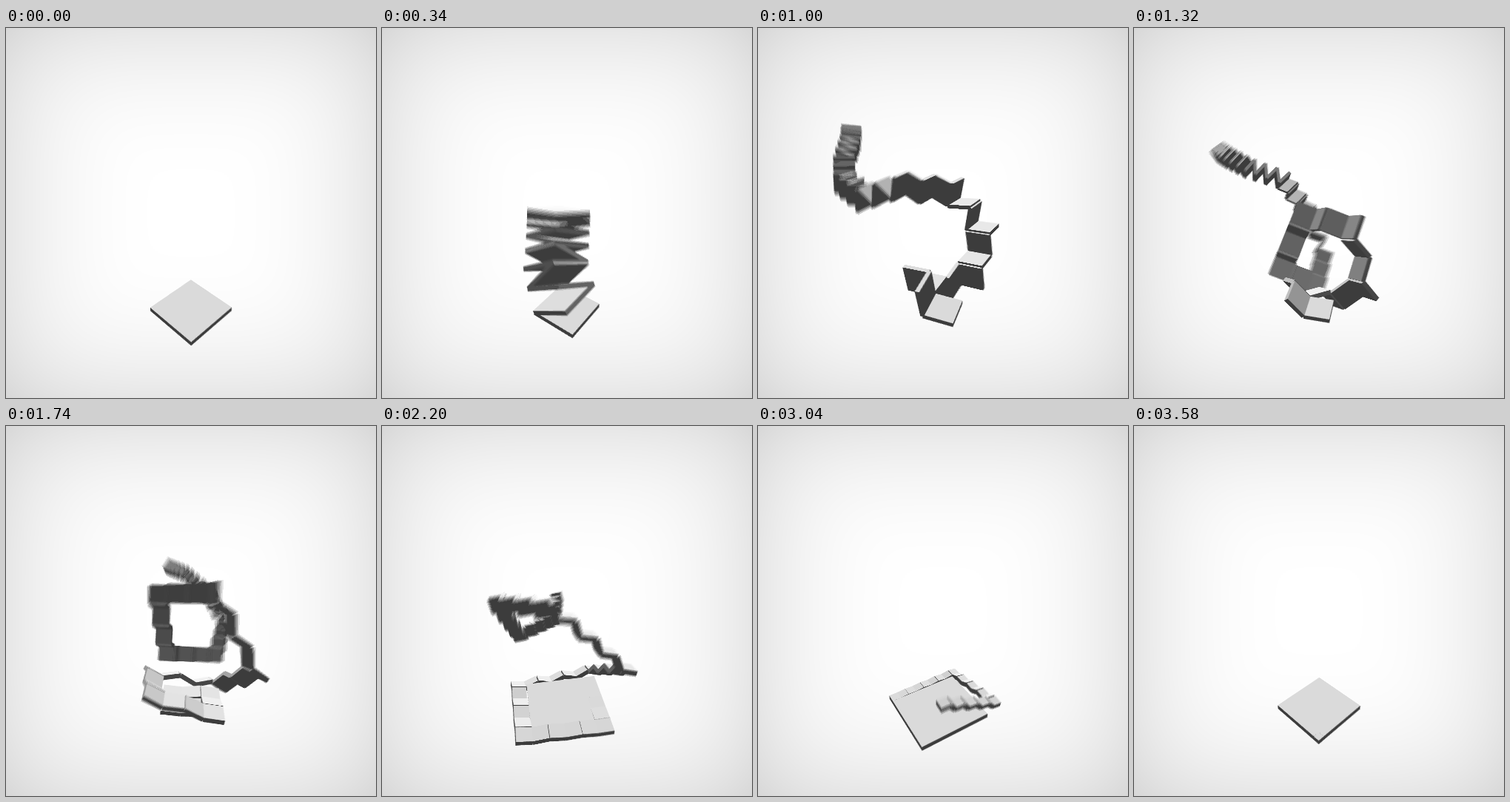
Write an HTML page with a canvas that moves like this. It is 500 px wide and 500 px high and loops after 3600 ms.

```html
<!DOCTYPE html>
<html lang="en">
<head>
<meta charset="utf-8">
<title>Unfolding tile</title>
<style>
  html, body { margin: 0; width: 100%; height: 100%; overflow: hidden; background: #fff; }
  canvas { display: block; }
</style>
</head>
<body>
<canvas id="stage" width="500" height="500"></canvas>
<script>
const SIZE = 500, MID = SIZE / 2;
const LOOP = 3600, FRAME = 20, SHUTTER = 16, SAMPLES = 8;
const EYE = 433, GROUND = 130, TILT = Math.PI / 6;
const SIDE = 78, THICK = 6.5, GRID = 9, HINGES = GRID * GRID - 1;

const ctx = document.getElementById('stage').getContext('2d');
const image = ctx.createImageData(SIZE, SIZE);
const pixels = new Uint32Array(image.data.buffer);
const depth = new Float32Array(SIZE * SIZE);
const shade = new Float32Array(SIZE * SIZE);
const total = new Float32Array(SIZE * SIZE);

// Soft vignette, white in the middle
const backdrop = Float32Array.from({ length: SIZE * SIZE }, (_, i) => {
  const x = (i % SIZE + 0.5 - MID) / MID;
  const y = (Math.floor(i / SIZE) + 0.5 - MID) / MID;
  return 255 - 25 * (x ** 4 + y ** 4) ** (2.7 / 4);
});

// Square spiral: left, back, right, front with legs of 1, 1, 2, 2, 3, 3, ...
const steps = [];
for (let leg = 0; steps.length < HINGES; leg++) {
  for (let j = 0; j <= leg >> 1 && steps.length < HINGES; j++) {
    steps.push({ axis: leg % 2 ? 2 : 0, sign: leg % 4 < 2 ? -1 : 1 });
  }
}

const dot = (a, b) => a[0] * b[0] + a[1] * b[1] + a[2] * b[2];
const mix = (a, k, b, m) => a.map((v, i) => v * k + b[i] * m);

function project([x, y, z]) {
  const f = EYE / (EYE - z);
  return [MID + x * f, MID + y * f];
}

// Fills a convex polygon, testing against the depth buffer
function fillFace(points, normal, centre, tone, jx, jy) {
  const scale = 1 / (dot(normal, centre) - EYE * normal[2]);
  const qx = normal[0] * scale, qy = normal[1] * scale, q0 = -EYE * normal[2] * scale;
  const ys = points.map(p => p[1]);
  const top = Math.max(0, Math.ceil(Math.min(...ys) - jy));
  const bottom = Math.min(SIZE, Math.ceil(Math.max(...ys) - jy));
  for (let row = top; row < bottom; row++) {
    const y = row + jy;
    let lo = Infinity, hi = -Infinity;
    for (let i = 0; i < 4; i++) {
      const a = points[i], b = points[(i + 1) % 4];
      if ((a[1] <= y) === (b[1] <= y)) continue;
      const x = a[0] + (b[0] - a[0]) * (y - a[1]) / (b[1] - a[1]);
      lo = Math.min(lo, x);
      hi = Math.max(hi, x);
    }
    const end = Math.min(SIZE, Math.ceil(hi - jx));
    for (let col = Math.max(0, Math.ceil(lo - jx)); col < end; col++) {
      const q = qx * (col + jx - MID) + qy * (y - MID) + q0;
      const i = row * SIZE + col;
      if (q > depth[i]) {
        depth[i] = q;
        shade[i] = tone;
      }
    }
  }
}

function drawTile(origin, axes, half, jx, jy) {
  for (let k = 0; k < 3; k++) {
    const u = (k + 1) % 3, v = (k + 2) % 3;
    for (const side of [-1, 1]) {
      const normal = axes[k].map(c => c * side);
      const centre = mix(origin, 1, normal, half[k]);
      if (dot(normal, [-centre[0], -centre[1], EYE - centre[2]]) <= 0) continue;
      const points = [[-1, -1], [1, -1], [1, 1], [-1, 1]].map(([a, b]) =>
        project(mix(mix(centre, 1, axes[u], a * half[u]), 1, axes[v], b * half[v])));
      const tone = 60 + 182 * Math.max(0, -normal[1]);
      fillFace(points, normal, centre, tone, jx, jy);
    }
  }
}

function drawChain(t, jx, jy) {
  const s = SIDE * GRID ** -t, half = [s / 2, THICK / 2, s / 2];
  const spin = Math.PI / 4 - t * Math.PI / 2;
  const c = Math.cos(spin), d = Math.sin(spin);
  const up = Math.sin(TILT), out = Math.cos(TILT);
  // Axes in view space: x right, y down, z towards the eye
  const axes = [[c, d * up, d * out], [0, -out, up], [-d, c * up, c * out]];
  let origin = [0, GROUND, 0];
  drawTile(origin, axes, half, jx, jy);

  for (let i = 0; i < HINGES; i++) {
    const open = Math.min(1, (t - 0.5 * (i + 1) / HINGES) / 0.5);
    if (open <= 0) break; // the rest lies folded in the same place
    const { axis, sign } = steps[i];
    const fold = (i % 2 ? -1 : 1) * Math.PI * (1 - open);
    const cos = Math.cos(fold), sin = Math.sin(fold);
    const along = axes[axis].map(v => v * sign), normal = axes[1];
    const turned = mix(along, cos, normal, sin);
    origin = mix(mix(origin, 1, along, s / 2), 1, turned, s / 2);
    axes[axis] = turned.map(v => v * sign);
    axes[1] = mix(normal, cos, along, -sin);
    drawTile(origin, axes, half, jx, jy);
  }
}

// Averages several moments, each with a sub-pixel shift, for blur and smooth edges
function render(time) {
  total.fill(0);
  for (let k = 0; k < SAMPLES; k++) {
    depth.fill(0);
    shade.set(backdrop);
    const t = (time + SHUTTER * k / SAMPLES) / LOOP % 1;
    drawChain(t, (k * 3 % SAMPLES + 0.5) / SAMPLES, (k + 0.5) / SAMPLES);
    for (let i = 0; i < total.length; i++) total[i] += shade[i];
  }
  for (let i = 0; i < total.length; i++) {
    pixels[i] = 0xff000000 | Math.round(total[i] / SAMPLES) * 0x010101;
  }
  ctx.putImageData(image, 0, 0);
}

let shown = -1;
function tick() {
  const time = Math.floor(performance.now() % LOOP / FRAME) * FRAME;
  if (time !== shown) render(shown = time);
  requestAnimationFrame(tick);
}
tick();
</script>
</body>
</html>
```
